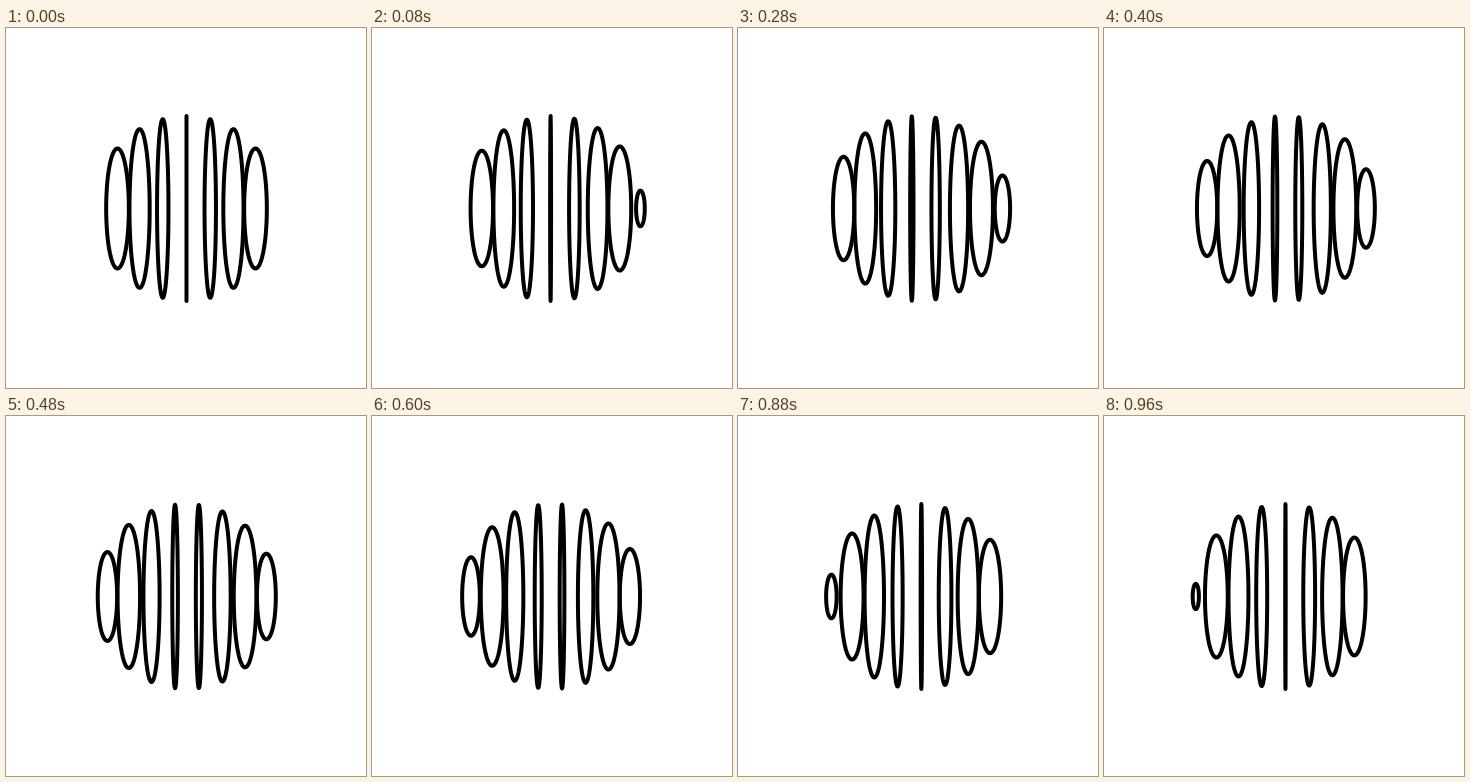
An HTML page with a canvas for the animation above (1 s loop, 360 px wide and 360 px high).

```html
<!DOCTYPE html>
<html lang="en">
<head>
<meta charset="utf-8">
<title>Sphere of rings</title>
<style>
html, body { margin: 0; width: 100%; height: 100%; overflow: hidden; background: #fff; }
canvas { display: block; }
</style>
</head>
<body>
<canvas id="stage" width="360" height="360"></canvas>
<script>
const ctx = document.getElementById('stage').getContext('2d');
const LOOP = 1000, STEP = 40;
const RINGS = 8, RADIUS = 89.5, EYE = 360, MID = 180.5;
const GAP = 2 * RADIUS / RINGS, SIDES = 120;

// A vertical slice of the sphere at offset x, projected point by point.
function ring(x) {
  const r2 = RADIUS * RADIUS - x * x;
  if (r2 < 1) return;
  const r = Math.sqrt(r2);
  ctx.beginPath();
  for (let i = 0; i < SIDES; i++) {
    const a = i / SIDES * 2 * Math.PI;
    const zoom = EYE / (EYE - r * Math.cos(a));
    ctx.lineTo(MID + x * zoom, MID + r * Math.sin(a) * zoom);
  }
  ctx.closePath();
  ctx.stroke();
}

function draw(now) {
  const t = Math.floor(now % LOOP / STEP) * STEP / LOOP;
  ctx.fillStyle = '#fff';
  ctx.fillRect(0, 0, 360, 360);
  ctx.strokeStyle = '#000';
  ctx.lineWidth = 4;
  ctx.lineJoin = ctx.lineCap = 'round';
  for (let i = 0; i <= RINGS; i++) ring((i - t) * GAP - RADIUS);
}

const start = performance.now();
function tick() {
  draw(performance.now() - start);
  requestAnimationFrame(tick);
}
tick();
</script>
</body>
</html>
```
